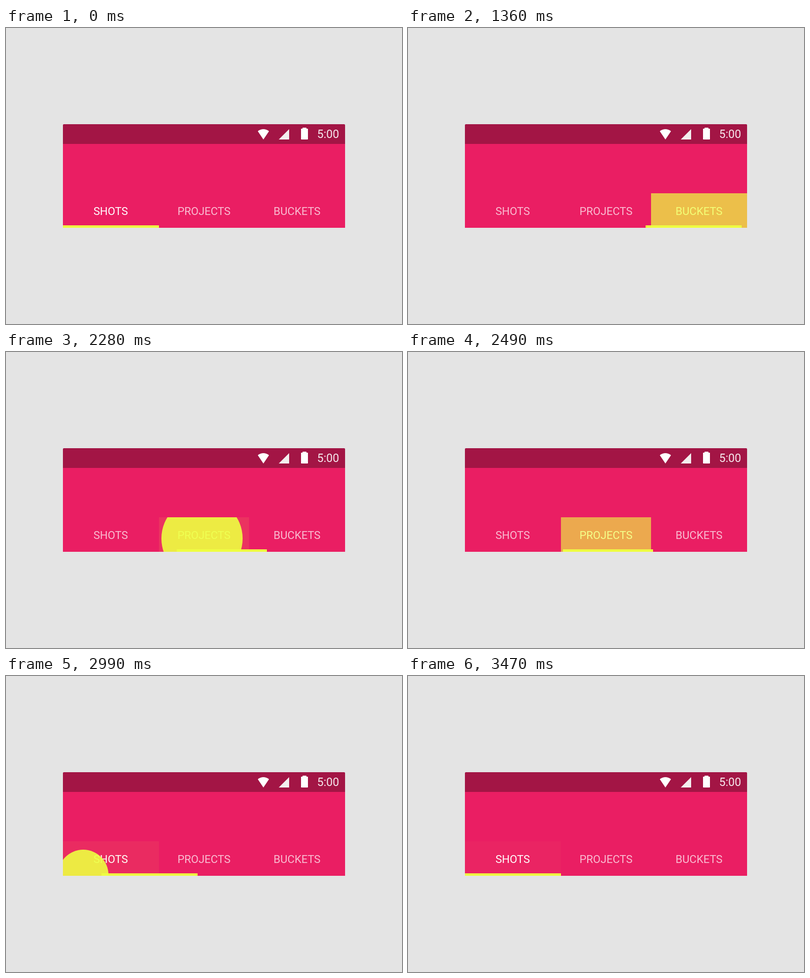
These frames come from a looping animation (800x600 px, 3530 ms). An HTML page with a canvas:

```html
<!DOCTYPE html>
<html lang="en">
<head>
<meta charset="utf-8">
<title>Tabs</title>
<style>
html, body { margin: 0; width: 100%; height: 100%; overflow: hidden; background: #e4e4e4; }
canvas { display: block; }
</style>
</head>
<body>
<canvas id="stage" width="800" height="600"></canvas>
<script>
const ctx = document.getElementById('stage').getContext('2d');
const LOOP = 3530, STEP = 30, LAST_STEP = 19;
const PINK = '#ea1e63', DARK = '#a31545', LIME = '#eeff41';
const TOP = 335, HEIGHT = 70, DIM = 0.7;

const tabs = [
  { label: 'SHOTS', x: 115, w: 194, mid: 211.5 },
  { label: 'PROJECTS', x: 309, w: 182, mid: 400 },
  { label: 'BUCKETS', x: 491, w: 194, mid: 588 }
];

// Each press: start time, tabs involved, touch point, full ripple radius, bar settling time
const presses = [
  { at: 1000, from: 0, to: 2, x: 597, y: 378, reach: 234, settle: 510 },
  { at: 2100, from: 2, to: 1, x: 396, y: 378, reach: 222, settle: 510 },
  { at: 2900, from: 1, to: 0, x: 156, y: 403, reach: 234, settle: 540 }
];

const clamp = v => Math.max(0, Math.min(1, v));
const smooth = v => v * v * (3 - 2 * v);

function rect(x, y, w, h, color) {
  ctx.fillStyle = color;
  ctx.fillRect(x, y, w, h);
}

function polygon(points, color) {
  ctx.beginPath();
  points.forEach(([x, y]) => ctx.lineTo(x, y));
  ctx.closePath();
  ctx.fillStyle = color;
  ctx.fill();
}

function label(text, x, y, size, alpha) {
  ctx.font = size + 'px Roboto, sans-serif';
  ctx.textAlign = 'center';
  ctx.textBaseline = 'alphabetic';
  ctx.fillStyle = `rgba(255,255,255,${alpha})`;
  ctx.fillText(text, x, y);
}

function drawCard() {
  rect(0, 0, 800, 600, '#e4e4e4');
  rect(115, 235, 570, 170, PINK);
  ctx.beginPath();
  ctx.roundRect(115, 195, 570, 40, [2, 2, 0, 0]);
  ctx.fillStyle = DARK;
  ctx.fill();

  // wifi
  ctx.beginPath();
  ctx.moveTo(520, 226);
  ctx.lineTo(508.7, 209.3);
  ctx.quadraticCurveTo(520, 200.9, 531.3, 209.3);
  ctx.closePath();
  ctx.fillStyle = '#fff';
  ctx.fill();

  polygon([[551, 226], [572, 205], [572, 226]], '#f3eeee');

  // battery
  ctx.beginPath();
  ctx.roundRect(596, 204, 14, 22, 1);
  ctx.roundRect(599, 202, 8, 3, 1);
  ctx.fillStyle = '#fff';
  ctx.fill();

  label('5:00', 650.7, 223, 23, 0.9);
}

function drawLabels(press, ms) {
  const fade = clamp((ms + 43) / 100) ** 2;
  tabs.forEach((tab, i) => {
    let alpha = DIM;
    if (!press) alpha = i === 0 ? 1 : DIM;
    else if (i === press.to) alpha = DIM + (1 - DIM) * fade;
    else if (i === press.from) alpha = 1 - (1 - DIM) * fade;
    label(tab.label, tab.mid, 379, 22, alpha);
  });
}

function drawRipple(press, ms) {
  const k = Math.min(ms / STEP, LAST_STEP);
  const tab = tabs[press.to];
  const wave = Math.max(0.01, 0.9 * (1 - smooth(clamp((k - 8.5) / 11.1))));
  const wash = Math.min(0.015 * (k + 1), 0.093, wave);
  const radius = press.reach * (1 - Math.pow(80, -(0.0069 + 0.0164 * k)));
  ctx.save();
  ctx.beginPath();
  ctx.rect(tab.x, TOP, tab.w, HEIGHT);
  ctx.clip();
  ctx.globalAlpha = wash;
  rect(tab.x, TOP, tab.w, HEIGHT, LIME);
  ctx.globalAlpha = wave;
  ctx.beginPath();
  ctx.arc(press.x, press.y, radius, 0, Math.PI * 2);
  ctx.fill();
  ctx.restore();
}

function drawBar(press, ms) {
  const tab = tabs[press ? press.to : 0];
  let x = tab.x;
  if (press && ms < press.settle) {
    const left = Math.pow(1 - (ms + 42.7) / 800, 5);
    x = Math.round(tab.x + (tabs[press.from].x - tab.x) * left);
  }
  rect(x, 400, tab.w, 5, LIME);
}

function draw(time) {
  const press = presses.filter(p => time >= p.at).pop();
  const ms = press ? Math.floor((time - press.at) / STEP) * STEP : 0;
  drawCard();
  drawLabels(press, ms);
  if (press) drawRipple(press, ms);
  drawBar(press, ms);
}

const start = performance.now();
function tick() {
  draw((performance.now() - start) % LOOP);
  requestAnimationFrame(tick);
}
tick();
</script>
</body>
</html>
```
